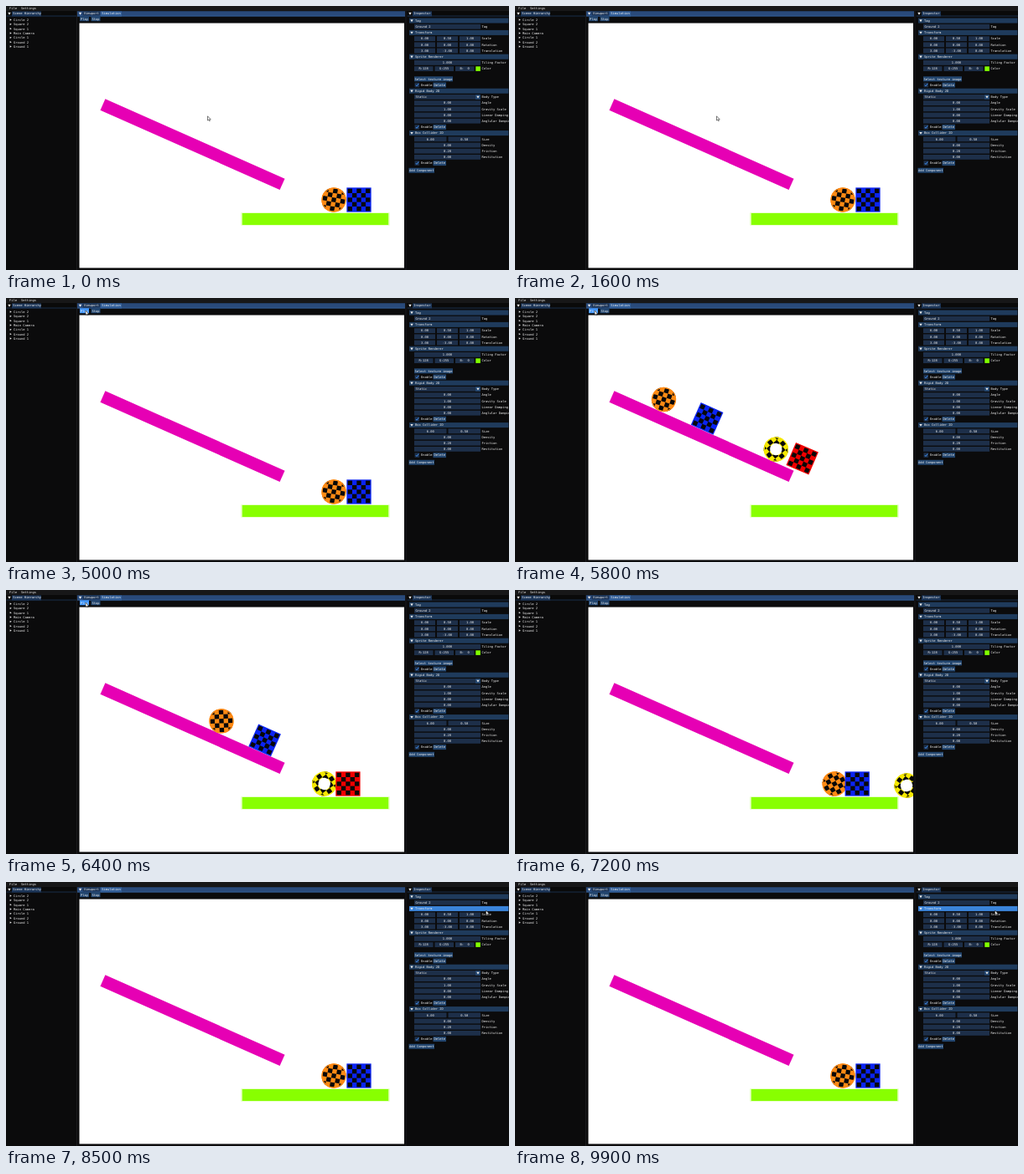
An HTML page that plays this animation: 600 by 316 pixels, repeating every 10000 ms.

```html
<!DOCTYPE html>
<html lang="en">
<head>
<meta charset="utf-8">
<title>Physics scene editor</title>
<style>
html, body { margin: 0; width: 600px; height: 316px; overflow: hidden; background: #0b0b0c; }
svg { display: block; }
text { font: 3.75px "DejaVu Sans Mono", "Liberation Mono", monospace; fill: #f0f0f0; white-space: pre; }
</style>
</head>
<body>
<svg id="stage" width="600" height="316" viewBox="0 0 600 316" xmlns="http://www.w3.org/2000/svg">
  <defs>
    <clipPath id="view"><rect x="87.5" y="20.5" width="387.5" height="293"/></clipPath>
    <clipPath id="disc"><circle r="14.65"/></clipPath>
  </defs>
  <g id="ui"></g>
  <g id="scene" clip-path="url(#view)"></g>
  <path id="cursor" d="M0 0V5.2L1.2 4.2 2 5.9 2.9 5.5 2.1 3.9H3.7Z" fill="#fff" stroke="#222" stroke-width=".6"/>
</svg>
<script>
const NS = "http://www.w3.org/2000/svg";
const ui = document.getElementById("ui");
const scene = document.getElementById("scene");
const cursor = document.getElementById("cursor");
const FIELD = "#1d2f49", BUTTON = "#23466f", HEADER = "#1f3b5c", TAB = "#1d3658";
const BAR = "#294a7a", ACTIVE = "#335f99", BRIGHT = "#4296fa";

function make(parent, tag, attrs) {
  const node = document.createElementNS(NS, tag);
  for (const key in attrs) node.setAttribute(key, attrs[key]);
  return parent.appendChild(node);
}
function box(x, y, width, height, fill, parent = ui) {
  return make(parent, "rect", { x, y, width, height, fill });
}
// Text is placed by its vertical centre.
function label(x, y, str, anchor = "start") {
  make(ui, "text", { x, y: y + 1.35, "text-anchor": anchor }).textContent = str;
}
function arrow(x, y, turn = 0, size = 1) {
  make(ui, "path", {
    d: "M-1.7-1.2h3.4l-1.7 2.9z", fill: "#f0f0f0",
    transform: `translate(${x} ${y}) rotate(${turn}) scale(${size})`
  });
}
function button(x, y, w, str) {
  const rect = box(x, y - 3, w, 6, BUTTON);
  label(x + w / 2, y, str, "middle");
  return rect;
}
function titleBar(x, w, tabWidth, str, bar, tab, line) {
  box(x, 6.2, w, 6.2, bar);
  box(x + 6.5, 6.4, tabWidth, 6, tab);
  box(x, 11.6, w, .8, line);
  arrow(x + 3.5, 9);
  label(x + 7.7, 9, str);
}

// Menu bar and left panel
box(0, 0, 600, 6, "#171718");
label(4, 3, "File");
label(18, 3, "Settings");
titleBar(.5, 83.5, 35, "Scene Hierarchy", "#0a0a0a", TAB, TAB);
["Circle 2", "Square 2", "Square 1", "Main Camera", "Circle 1", "Ground 2", "Ground 1"]
  .forEach((name, i) => {
    const y = 16.5 + i * 5.33;
    arrow(5.5, y, -90, .7);
    label(9, y, name);
  });

// Viewport panel
box(84, 6, 1, 310, "#1b1b1e");
titleBar(85, 391, 20.5, "Viewport", BAR, "#1c3456", ACTIVE);
box(113, 6.4, 25, 6, ACTIVE);
label(114.3, 9, "Simulation");
const play = button(88, 15.2, 11, "Play");
button(101.5, 15.2, 11, "Stop");
box(87.5, 20.5, 387.5, 293, "#fff");
box(476.5, 6, 1, 310, "#1b1b1e");

// Inspector: every call takes the next line.
titleBar(478.5, 121.5, 23, "Inspector", "#0a0a0a", TAB, TAB);
const PITCH = 7.2;
let line = 17.5 - PITCH;
const next = (gap = 0) => line += PITCH + gap;

function header(str) {
  const y = next();
  const rect = box(481, y - 3, 118.4, 6, HEADER);
  arrow(484, y);
  label(488, y, str);
  return rect;
}
function row(name, values, span = 79) {
  const y = next(), w = (span + 2) / values.length - 2;
  values.forEach((str, i) => {
    const x = 487 + i * (w + 2);
    box(x, y - 2.9, w, 5.8, FIELD);
    label(x + w / 2, y, str, "middle");
  });
  label(567.5, y, name);
  return y;
}
function textRow(name, str) {
  const y = row(name, [""]);
  label(488.5, y, str);
  return y;
}
function enable() {
  const y = next();
  box(487.5, y - 2.8, 5.6, 5.6, FIELD);
  make(ui, "path", { d: `M488.8 ${y}l1.2 1.4 2.2-3`, fill: "none", stroke: BRIGHT, "stroke-width": .9 });
  label(495, y, "Enable");
  button(509.5, y, 15.5, "Delete");
}

header("Tag");
textRow("Tag", "Ground 2");
const transform = header("Transform");
row("Scale", ["6.00", "0.50", "1.00"]);
row("Rotation", ["0.00", "0.00", "0.00"]);
row("Translation", ["3.00", "-3.00", "0.00"]);
header("Sprite Renderer");
row("Tiling Factor", ["1.000"]);
const colorY = row("Color", ["R:128", "G:255", "B:  0"], 71.5);
box(560.3, colorY - 2.8, 5.6, 5.6, "#80ff00");
button(487, next(5), 46, "Select texture image");
enable();
header("Rigid Body 2D");
const comboY = textRow("Body Type", "Static");
box(560, comboY - 2.9, 6, 5.8, BUTTON);
arrow(563, comboY);
row("Angle", ["0.00"]);
row("Gravity Scale", ["1.00"]);
row("Linear Damping", ["0.00"]);
row("Anglular Damping", ["0.00"]);
enable();
header("Box Collider 2D");
row("Size", ["6.00", "0.50"]);
row("Density", ["0.00"]);
row("Friction", ["0.20"]);
row("Restitution", ["0.00"]);
enable();
button(480.5, next(1.5), 30.5, "Add Component");

// Fixed ground pieces
box(280.5, 247.5, 177, 15, "#d4ff9c", scene);
box(282, 248, 174, 14, "#88ff00", scene);
box(-117.2, -7.3, 234.4, 14.6, "#e600b4", scene)
  .setAttribute("transform", "translate(222.5 165.7) rotate(24)");

const SIZE = 29.3, RADIUS = SIZE / 2;

function checker(color, round, hole) {
  const g = make(scene, "g", {});
  const inner = make(g, "g", round ? { "clip-path": "url(#disc)" } : {});
  const rim = 1.3, cell = (SIZE - 2 * rim) / 5, corner = rim - RADIUS;
  box(-RADIUS, -RADIUS, SIZE, SIZE, color, inner);
  for (let i = 0; i < 25; i += 2) {
    box(corner + (i % 5) * cell, corner + Math.floor(i / 5) * cell, cell, cell, "#080808", inner);
  }
  if (round) make(g, "circle", { r: RADIUS - .6, fill: "none", stroke: color, "stroke-width": 1.2 });
  if (hole) make(g, "circle", { r: 7.2, fill: "#fff" });
  return g;
}

// Seconds and pixels. s is the distance along the ramp from its middle.
const START = 5.1, ACCEL = 145, RAMP_END = 112, SPEED = 163, FALL = .32;
const PUSH = 1.65, PUSH_SPEED = 169;
const EDGE = { x: 333.7, y: 191 }, FLOOR = 232, GROUND_END = 457;
const SLOPE = 24 * Math.PI / 180;

const bodies = [
  { color: "#f5e800", round: true, first: true, s0: 52, stop: 391 },
  { color: "#f00000", first: true, s0: 82, stop: 421 },
  { color: "#ff8a14", round: true, s0: -94.5, stop: 391 },
  { color: "#0b24f2", s0: -38, stop: 421 }
];
for (const body of bodies) body.node = checker(body.color, body.round, body.round && body.first);

function pose({ s0, stop, round, first }, t) {
  const roll = s => 68 + s / RADIUS * 180 / Math.PI;
  const s = s0 + ACCEL * t * t / 2;
  if (s < RAMP_END) {
    const back = s - RAMP_END;
    return [EDGE.x + back * Math.cos(SLOPE), EDGE.y + back * Math.sin(SLOPE), round ? roll(s) : 24];
  }
  // Off the ramp: drop to the floor while sliding to a stop.
  const since = t - Math.sqrt(2 * (RAMP_END - s0) / ACCEL);
  const way = stop - EDGE.x;
  const slide = Math.min(1, since * SPEED / (2 * way));
  const drop = Math.min(1, since / FALL) ** 2;
  // The second pair knocks the first off the ground.
  const pushed = first ? Math.max(0, t - PUSH) * PUSH_SPEED : 0;
  const x = EDGE.x + way * (1 - (1 - slide) ** 2) + pushed;
  const over = Math.max(0, x - GROUND_END);
  const y = EDGE.y + (FLOOR - EDGE.y) * drop + .02 * over * over;
  return [x, y, round ? roll(RAMP_END + x - EDGE.x) : 24 * (1 - drop) + over];
}

const moves = [
  { at: 2.4, time: .8, x: 159, y: 135 },
  { at: 3.8, time: .9, x: 95, y: 15 },
  { at: 6.7, time: 1, x: 572.5, y: 34 }
];
function pointer(t) {
  let x = 240.5, y = 131.8;
  for (const move of moves) {
    const k = Math.min(1, Math.max(0, (t - move.at) / move.time));
    const ease = k * k * (3 - 2 * k);
    x += (move.x - x) * ease;
    y += (move.y - y) * ease;
  }
  return [x, y];
}

function draw(t) {
  const running = t >= START;
  for (const body of bodies) {
    const [x, y, angle] = pose(body, running ? t - START : 5);
    body.node.setAttribute("transform", `translate(${x} ${y}) rotate(${angle})`);
  }
  const [px, py] = pointer(t);
  cursor.setAttribute("transform", `translate(${px} ${py})`);
  cursor.style.display = t > 7.05 && t < 7.35 ? "none" : "";
  play.setAttribute("fill", px >= 88 && px < 99 && py > 12 && py < 18 ? BRIGHT : BUTTON);
  transform.setAttribute("fill", px > 481 && py > 29 && py < 35 ? "#3b84da" : HEADER);
}

const begin = performance.now();
function tick() {
  const ms = (performance.now() - begin) % 10000;
  draw(Math.floor(ms / 100) / 10);
  requestAnimationFrame(tick);
}
tick();
</script>
</body>
</html>
```
